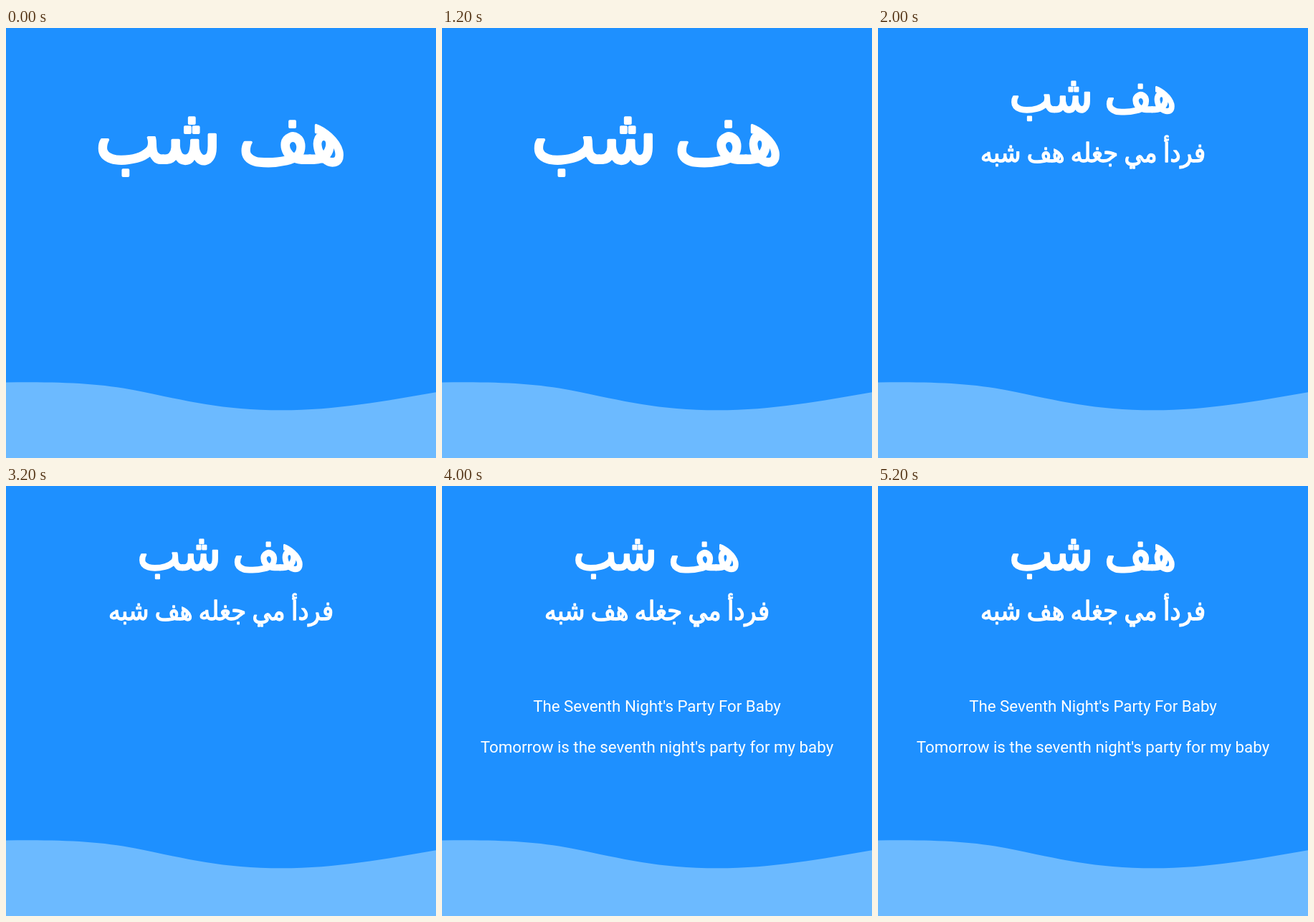
An HTML page with a canvas for the animation above (6000 ms loop, 600 by 600 pixels).

```html
<!DOCTYPE html>
<html lang="ar">
<head>
<meta charset="utf-8">
<title>هف شب</title>
<style>
  html, body { margin: 0; width: 100%; height: 100%; overflow: hidden; background: #1e90ff; }
  canvas { display: block; }
</style>
</head>
<body>
<canvas id="stage" width="600" height="600"></canvas>
<script>
const ctx = document.getElementById('stage').getContext('2d');
const STEP = 2000;
const STEPS = 3;
const CENTER = 300;
const ARABIC = '"DejaVu Sans", sans-serif';
const LATIN = 'Roboto, sans-serif';

function drawBackground() {
  ctx.fillStyle = '#1e90ff';
  ctx.fillRect(0, 0, 600, 600);
  ctx.fillStyle = '#6cbaff';
  ctx.beginPath();
  ctx.moveTo(0, 494.5);
  ctx.bezierCurveTo(75, 493.5, 128, 495.5, 180, 505.5);
  ctx.bezierCurveTo(255, 520.5, 300, 533.3, 385, 533.3);
  ctx.bezierCurveTo(460, 533.3, 530, 520.3, 600, 508.2);
  ctx.lineTo(600, 600);
  ctx.lineTo(0, 600);
  ctx.fill();
}

function setArabicFont(size) {
  ctx.font = `semi-condensed ${size}px ${ARABIC}`;
  ctx.wordSpacing = `${-0.06 * size}px`;
  ctx.lineWidth = 0.035 * size;
}

// Chooses a font size from the visible span, centres the ink and thickens it with an outline.
function drawArabic(text, span, baseline) {
  ctx.direction = 'rtl';
  setArabicFont(100);
  const box = ctx.measureText(text);
  const left = box.actualBoundingBoxLeft + ctx.lineWidth / 2;
  const right = box.actualBoundingBoxRight + ctx.lineWidth / 2;
  const scale = span / (left + right);
  setArabicFont(100 * scale);
  const x = CENTER - (right - left) / 2 * scale;
  ctx.fillText(text, x, baseline);
  ctx.strokeText(text, x, baseline);
  ctx.wordSpacing = '0px';
}

function drawLatin(text, baseline) {
  ctx.direction = 'ltr';
  ctx.font = `22.3px ${LATIN}`;
  ctx.fillText(text, CENTER, baseline);
}

function draw(step) {
  drawBackground();
  ctx.fillStyle = ctx.strokeStyle = '#fff';
  ctx.textAlign = 'center';
  ctx.lineJoin = 'round';
  if (step === 0) {
    drawArabic('هف شب', 344, 188);
    return;
  }
  drawArabic('هف شب', 229, 117);
  drawArabic('فردأ مي جغله هف شبه', 311, 186.5);
  if (step === 2) {
    drawLatin("The Seventh Night's Party For Baby", 315);
    drawLatin("Tomorrow is the seventh night's party for my baby", 372);
  }
}

const start = performance.now();
function tick() {
  const elapsed = performance.now() - start;
  draw(Math.floor(elapsed / STEP) % STEPS);
  requestAnimationFrame(tick);
}
tick();
</script>
</body>
</html>
```
